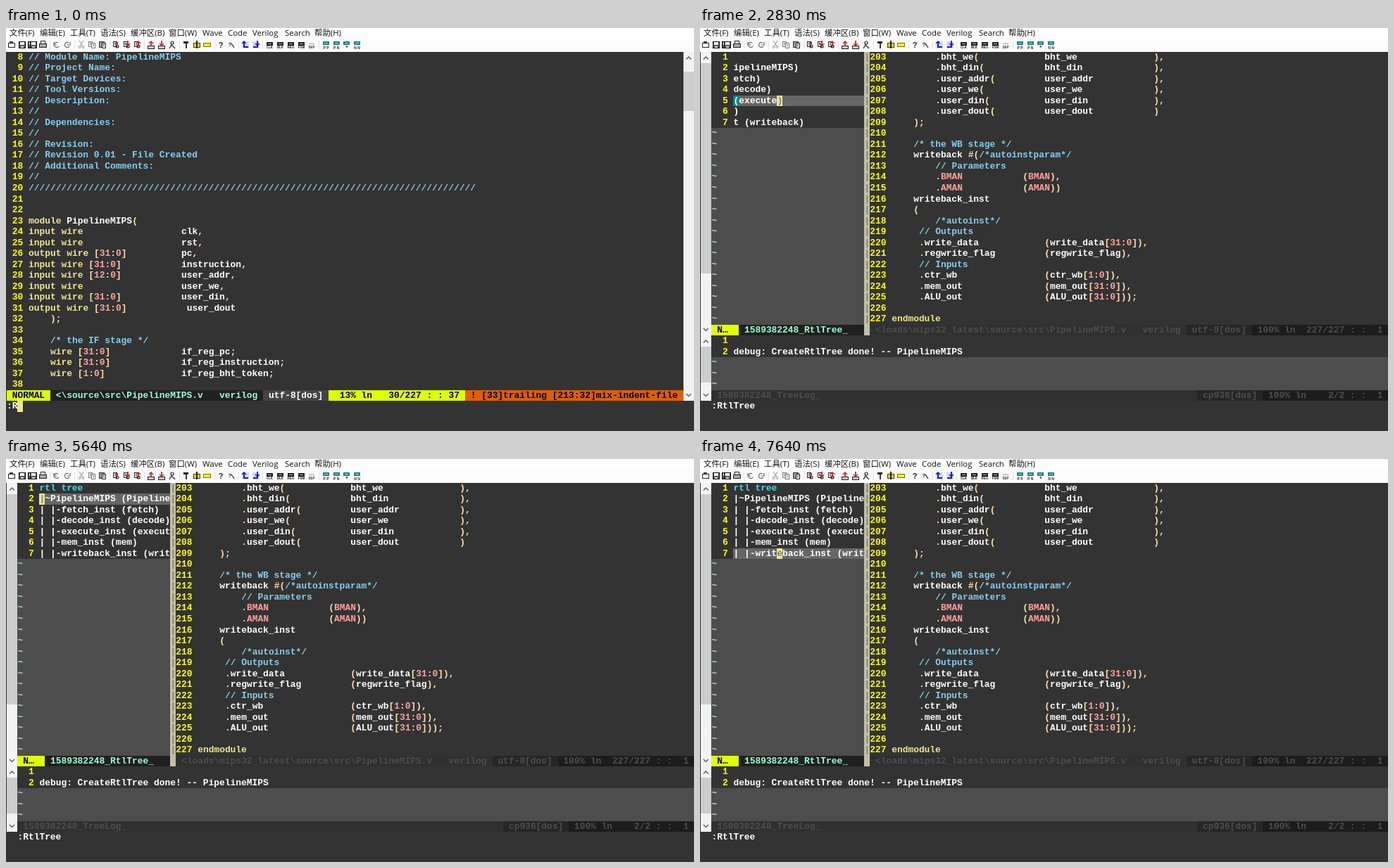
These frames come from a looping animation (977 px wide and 573 px high, 8000 ms). An HTML page with a canvas:

```html
<!DOCTYPE html>
<html lang="zh">
<head>
<meta charset="utf-8">
<title>RtlTree</title>
<style>
html, body { margin: 0; width: 100%; height: 100%; overflow: hidden; background: #333; }
canvas { display: block; width: 977px; height: 573px; }
</style>
</head>
<body>
<canvas id="stage" width="977" height="573"></canvas>
<script>
const ctx = document.getElementById('stage').getContext('2d');
const LOOP = 8000, CW = 7.75, RH = 15.508, TOP = 33.9, LEFT = 0.9, BAR = 15.5;
const MONO = 'bold 12.917px "Liberation Mono", monospace';
const C = {
  bg: '#333333', empty: '#4d4d4d', text: '#ffffff', number: '#ffff00', comment: '#87ceeb',
  key: '#f0e68c', value: '#ffa0a0', op: '#ffdead', line: '#666666', match: '#008b8b',
  cursor: '#f0e68c', onCursor: '#708090', lime: '#dfff00', navy: '#00005f', mint: '#9cffd3',
  dark: '#202020', mid: '#444444', orange: '#df5f00', dim: '#4e4e4e', split: '#c2bfa5'
};

const pad = (s, n) => s.padEnd(n);
const port = (type, name) => pad(type, 28) + name;
const pin = (name, end = '),') => pad(pad('        .' + name + '(', 28) + name, 48) + end;
const conn = (name, value) => pad('     .' + name, 28) + '(' + value;
const param = (name, end) => pad('        .' + name, 24) + '(' + name + end;

const HEAD = [
  '// Module Name: PipelineMIPS', '// Project Name:', '// Target Devices:', '// Tool Versions:',
  '// Description:', '//', '// Dependencies:', '//', '// Revision:',
  '// Revision 0.01 - File Created', '// Additional Comments:', '//', '/'.repeat(82), '', '',
  'module PipelineMIPS(',
  port('input wire', 'clk,'), port('input wire', 'rst,'), port('output wire [31:0]', 'pc,'),
  port('input wire [31:0]', 'instruction,'), port('input wire [12:0]', 'user_addr,'),
  port('input wire', 'user_we,'), port('input wire [31:0]', 'user_din,'),
  port('output wire [31:0]', ' user_dout'), '    );', '', '    /* the IF stage */',
  port('    wire [31:0]', 'if_reg_pc;'), port('    wire [31:0]', 'if_reg_instruction;'),
  port('    wire [1:0]', 'if_reg_bht_token;'), ''
];
const TAIL = [
  pin('bht_we'), pin('bht_din'), pin('user_addr'), pin('user_we'), pin('user_din'),
  pin('user_dout', ')'), '    );', '', '    /* the WB stage */',
  '    writeback #(/*autoinstparam*/', '        // Parameters',
  param('BMAN', '),'), param('AMAN', '))'), '    writeback_inst', '    (',
  '        /*autoinst*/', '     // Outputs', conn('write_data', 'write_data[31:0]),'),
  conn('regwrite_flag', 'regwrite_flag),'), '     // Inputs', conn('ctr_wb', 'ctr_wb[1:0]),'),
  conn('mem_out', 'mem_out[31:0]),'), conn('ALU_out', 'ALU_out[31:0]));'), '', 'endmodule'
];
const TREE = ['rtl tree', '|~PipelineMIPS (PipelineMIPS)'].concat(
  ['fetch', 'decode', 'execute', 'mem', 'writeback'].map(s => `| |-${s}_inst (${s})`));

// Tree cursor: time, line, column
const MOVES = [
  [1720, 6, 29], [2310, 5, 17], [2370, 6, 29], [2620, 5, 17], [2830, 4, 25], [3040, 3, 23],
  [3310, 2, 21], [3490, 1, 28], [4690, 1, 0], [5090, 0, 0], [5150, 1, 0], [5330, 2, 0],
  [5640, 1, 0], [5730, 2, 0], [6040, 2, 1], [6540, 2, 2], [6590, 2, 4], [6640, 2, 5],
  [6690, 2, 7], [6750, 2, 8], [6810, 3, 8], [7060, 4, 8], [7180, 5, 8], [7360, 6, 8],
  [7580, 5, 8], [7640, 6, 8]
];
const BLINK_OFF = [[1860, 2100], [4200, 4480]];

const rowY = r => TOP + r * RH;

function box(x, y, w, h, color) {
  const l = Math.round(x), t = Math.round(y);
  ctx.fillStyle = color;
  ctx.fillRect(l, t, Math.round(x + w) - l, Math.round(y + h) - t);
}

const cells = (x, row, cols, color, rows = 1) => box(x, rowY(row), cols * CW, rows * RH, color);

function put(s, x, row, color = C.text) {
  ctx.font = MONO;
  ctx.fillStyle = color;
  ctx.fillText(s, x, rowY(row) + 11);
}

const TOKEN = /(\/\/.*|\/\*.*?\*\/)|\b(module|endmodule|input|output|wire)\b|\b(\d+|[A-Z][A-Z0-9_]*)\b|([()[\]:;,.#]+)|\w+/g;

function code(lines, first, x) {
  lines.forEach((s, i) => {
    put(String(first + i).padStart(3), x, i, C.number);
    for (const m of s.matchAll(TOKEN)) {
      const color = m[1] ? C.comment : m[2] ? C.key : m[3] ? C.value : m[4] ? C.op : C.text;
      put(m[0], x + (4 + m.index) * CW, i, color);
    }
  });
}

function status(x, row, parts) {
  for (const [s, bg, fg] of parts) {
    cells(x, row, s.length, bg);
    put(s, x, row, fg);
    x += s.length * CW;
  }
}

function tildes(x, row, count, cols) {
  cells(x, row, cols, C.empty, count);
  for (let i = 0; i < count; i++) put('~', x, row + i, '#add8e6');
}

function chevron(x, y, dir) {
  ctx.strokeStyle = '#606060';
  ctx.lineWidth = 1.5;
  ctx.beginPath();
  ctx.moveTo(x - 3.5, y + 2 * dir);
  ctx.lineTo(x, y - 1.5 * dir);
  ctx.lineTo(x + 3.5, y + 2 * dir);
  ctx.stroke();
}

function scrollbar(x, y1, y2, thumb1, thumb2) {
  box(x, y1, BAR, y2 - y1, '#f3f3f3');
  box(x, thumb1, BAR, thumb2 - thumb1, '#cdcdcd');
  chevron(x + 7.5, y1 + 8.5, 1);
  chevron(x + 7.5, y2 - 8, -1);
}

function menu() {
  box(0, 0, 977, 34, '#ffffff');
  box(0, 15, 977, 19, '#fcfcfc');
  ctx.font = '11.4px "Open Sans", "Noto Sans CJK SC", sans-serif';
  ctx.fillStyle = '#111';
  const items = [['文件(F)', 5], ['编辑(E)', 48], ['工具(T)', 91], ['语法(S)', 134], ['缓冲区(B)', 177],
    ['窗口(W)', 231], ['Wave', 279], ['Code', 315], ['Verilog', 350], ['Search', 396], ['帮助(H)', 438]];
  for (const [s, x] of items) ctx.fillText(s, x, 11);
}

function frame(x, y, w, h, stroke = '#222', fill = '#fff') {
  box(x, y, w, h, stroke);
  box(x + 1, y + 1, w - 2, h - 2, fill);
}

function stroke(color, width, ...pts) {
  ctx.strokeStyle = color;
  ctx.lineWidth = width;
  ctx.beginPath();
  pts.forEach(([x, y], i) => i ? ctx.lineTo(x, y) : ctx.moveTo(x, y));
  ctx.stroke();
}

function ring(x, y, r, color, from = 0, to = 7) {
  ctx.strokeStyle = color;
  ctx.lineWidth = 1.2;
  ctx.beginPath();
  ctx.arc(x, y, r, from, to);
  ctx.stroke();
}

function label(s, x, y, size, color) {
  ctx.font = `bold ${size}px "Liberation Sans", sans-serif`;
  ctx.fillStyle = color;
  ctx.textAlign = 'center';
  ctx.fillText(s, x, y);
  ctx.textAlign = 'left';
}

function disk(x) {
  frame(x - 5, 19, 10, 10, '#111', '#555');
  box(x - 3, 20, 6, 4, '#fff');
  box(x - 2, 26, 4, 2, '#ddd');
}

function page(x, y, color) {
  frame(x, y, 6, 8, color);
  box(x + 2, y + 2, 2, 1, color);
  box(x + 2, y + 4, 2, 1, color);
}

function arrow(x, y, dir, color) {
  stroke(color, 1.8, [x, y - 4 * dir], [x, y + 2 * dir]);
  stroke(color, 1.4, [x - 3, y], [x, y + 3 * dir], [x + 3, y]);
}

function toolbar() {
  for (const x of [62, 97, 147, 196, 246, 296, 330, 364, 444]) box(x, 18, 1, 12, '#e2e2e2');
  frame(3, 21, 10, 7);
  box(5, 19, 5, 2, '#444');
  disk(23);
  disk(36);
  disk(39);
  frame(47, 22, 11, 6, '#222', '#aaa');
  frame(49, 18, 7, 5);
  for (const [x, s] of [[72, 1], [87, -1]]) {
    ring(x, 24, 3.5, '#666', 0.5, 5.3);
    stroke('#666', 1.2, [x - 4 * s, 20], [x - 4 * s, 24], [x, 24]);
  }
  stroke('#aaa', 1.2, [104, 18], [109, 26]);
  stroke('#aaa', 1.2, [110, 18], [105, 26]);
  ring(104.5, 27, 1.5, '#aaa');
  ring(109.5, 27, 1.5, '#aaa');
  page(117, 19, '#777');
  page(121, 21, '#777');
  frame(132, 19, 8, 9, '#333', '#999');
  page(136, 21, '#222');
  for (const [x, i] of [[156, 0], [171, 1], [186, 2]]) {
    page(x - 4, 19, '#222');
    ring(x + 2, 26, 2, '#222');
    if (i) arrow(x + 2, 22, i === 1 ? 1 : -1, '#c22');
    else box(x, 20, 3, 3, '#c22');
  }
  for (const [x, d] of [[206, -1], [221, 1]]) {
    frame(x - 5, 25, 10, 5, '#222', '#ccc');
    arrow(x, 22, d, '#c22');
  }
  ring(236, 21, 2, '#222');
  stroke('#222', 1.3, [232, 29], [235, 24], [240, 29]);
  stroke('#222', 1.8, [256, 21], [256, 29]);
  box(252, 19, 7, 3, '#222');
  frame(266, 21, 10, 7, '#443c00', '#e8d800');
  box(270, 18, 2, 11, '#222');
  frame(280, 21, 11, 6, '#777000', '#f4ee20');
  label('?', 305, 28, 11, '#222');
  label('?', 318, 26, 8, '#222');
  stroke('#222', 1.3, [320, 22], [324, 28]);
  for (const [x, d] of [[340, 1], [355, -1]]) {
    box(x - 5, 19, 10, 10, '#d4d8ff');
    stroke('#1520c0', 2, [x - 2 * d, 20], [x - 2 * d, 27], [x + 4 * d, 27]);
    arrow(x - 2 * d, 22, -d, '#1520c0');
  }
  ['CLK', 'BLK', 'REG', 'FSM'].forEach((s, i) => {
    const x = 374 + i * 15;
    box(x - 4, 20, 9, 5, '#222');
    box(x - 2, 22, 5, 1, '#bbb');
    label(s, x + 0.5, 29, 4.5, '#222');
  });
  box(430, 22, 8, 1, '#999');
  label('SEP', 434, 28.5, 4.5, '#333');
  ['P P', 'P N', '*', 'N N'].forEach((s, i) => {
    const x = 454 + i * 14.7;
    box(x - 4, 19, 9, 5, '#247f88');
    box(x - 2, 21, 5, 1, '#a8dde0');
    label(s, x + 0.5, 29.5, s === '*' ? 8 : 5, '#222');
  });
}

function editor(x) {
  code(HEAD, 8, x);
  status(x, 31, [
    [' NORMAL ', C.lime, C.navy],
    [' <\\source\\src\\PipelineMIPS.v   verilog ', C.dark, C.mint],
    [' utf-8[dos] ', C.mid, C.text],
    ['  13% ln   30/227 : : 37 ', C.lime, C.navy],
    [' ! [33]trailing [213:32]mix-indent-file ', C.orange, '#000']
  ]);
}

function tree(t, x) {
  TREE.forEach((_, i) => put(String(i + 1).padStart(3), x, i, C.number));
  tildes(x, 7, 18, 28);
  if (t < 1480) return;
  const left = t < 4690 ? 17 : 0, x0 = x + 4 * CW;
  const [, line, col] = MOVES.filter(m => m[0] <= t).pop() || MOVES[0];
  const off = BLINK_OFF.some(([a, b]) => t >= a && t < b);
  const cx = c => x0 + (c - left) * CW;

  cells(x0, line, 24, C.line);
  const open = TREE[line].indexOf('(');
  if (TREE[line][col] === ')' && t >= 1860) {
    if (open >= left) cells(cx(open), line, 1, C.match);
    cells(cx(col), line, 1, C.match);
  }
  TREE.forEach((s, i) => put(s.slice(left, left + 24), x0, i, i ? C.text : '#4cd3e6'));
  if (!off) {
    cells(cx(col), line, 1, C.cursor);
    put(TREE[line][col], cx(col), line, C.onCursor);
  }
}

function panes(t, x) {
  const right = x + 29 * CW, edge = x + 28 * CW;
  tree(t, x);
  status(x, 25, [[' N…  ', C.lime, C.navy], [pad(' 1589382248_RtlTree_', 23), C.dark, C.mint]]);
  cells(edge, 0, 1, C.split, 26);
  for (let r = 0; r < 25; r++) put('|', edge, r, '#7f7f7f');

  code(TAIL, 203, right);
  status(right, 25, [
    [pad(' <loads\\mips32_latest\\source\\src\\PipelineMIPS.v   verilog', 58), '#303030', C.dim],
    [' utf-8[dos] ', '#262626', C.dim],
    [' 100% ln  227/227 : :  1 ', '#1c1c1c', C.dim]
  ]);

  put('  1', x, 26, C.number);
  put('  2', x, 27, C.number);
  if (t >= 1480) put('debug: CreateRtlTree done! -- PipelineMIPS', x + 4 * CW, 27);
  tildes(x, 28, 3, 124);
  status(x, 31, [
    [pad(' 1589382248_TreeLog_', 89), '#303030', C.dim],
    [' cp936[dos] ', '#262626', C.dim],
    [' 100% ln    2/2 : :  1 ', '#1c1c1c', C.dim]
  ]);
}

function draw(t) {
  box(0, 0, 977, 573, C.bg);
  menu();
  toolbar();
  const single = t < 1070, x = single ? LEFT : LEFT + BAR;
  if (t < 1190) editor(x);
  else panes(t, x);
  if (single) {
    scrollbar(962, 34, 530, 62, 118);
  } else {
    scrollbar(LEFT, 34, 437, 50, 349);
    scrollbar(LEFT, 437, 530, 453, 504);
  }
  const cmd = t < 400 ? ':R' : t < 580 ? ':Rt' : ':RtlTree';
  put(cmd, x, 32);
  if (t < 1010) cells(x + cmd.length * CW, 32, 1, C.cursor);
}

const start = performance.now();
function tick() {
  draw((performance.now() - start) % LOOP);
  requestAnimationFrame(tick);
}
tick();
</script>
</body>
</html>
```
